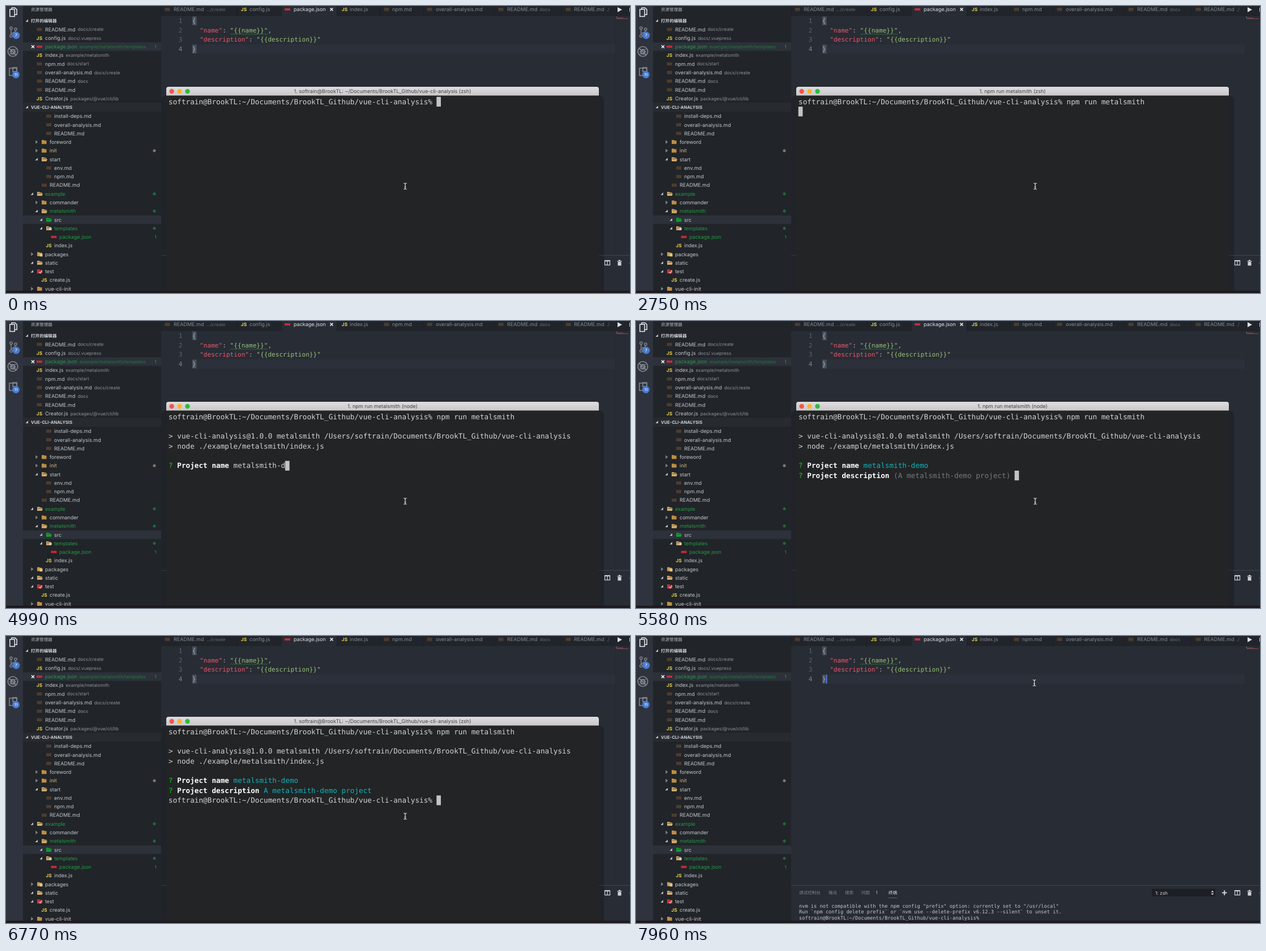
Write an HTML page with a canvas that moves like this. It is 1102 by 508 pixels and loops after 8000 ms.

```html
<!DOCTYPE html>
<html lang="zh">
<head>
<meta charset="utf-8">
<title>Metalsmith demo</title>
<style>
html, body { margin: 0; width: 100%; height: 100%; overflow: hidden; background: #282c34; }
canvas { display: block; }
</style>
</head>
<body>
<canvas id="stage" width="1102" height="508"></canvas>
<script>
const ctx = document.getElementById('stage').getContext('2d');
const LOOP = 8000;
const UI = 'Inter, "Noto Sans CJK SC", "Noto Sans CJK", sans-serif';
const MONO = '"DejaVu Sans Mono", monospace';
const USER = 'softrain@BrookTL:';
const REPO = '/Documents/BrookTL_Github/vue-cli-analysis';
const PROMPT = USER + '~' + REPO + '% ';
const GREEN = '#239a45', GREY = '#c5c8cc', DIM = '#7f858d';

function rect(x, y, w, h, color) {
  ctx.fillStyle = color;
  ctx.fillRect(x, y, w, h);
}

function rounded(x, y, w, h, radii, color) {
  ctx.fillStyle = color;
  ctx.beginPath();
  ctx.roundRect(x, y, w, h, radii);
  ctx.fill();
}

function shape(color, ...points) {
  ctx.fillStyle = color;
  ctx.beginPath();
  points.forEach(([x, y]) => ctx.lineTo(x, y));
  ctx.closePath();
  ctx.fill();
}

function line(color, width, ...points) {
  ctx.strokeStyle = color;
  ctx.lineWidth = width;
  ctx.beginPath();
  points.forEach(([x, y]) => ctx.lineTo(x, y));
  ctx.stroke();
}

function frame(x, y, w, h, color, width) {
  ctx.strokeStyle = color;
  ctx.lineWidth = width;
  ctx.strokeRect(x, y, w, h);
}

function disc(x, y, r, color) {
  ctx.fillStyle = color;
  ctx.beginPath();
  ctx.arc(x, y, r, 0, 7);
  ctx.fill();
}

function ring(x, y, r, color, width = 1.3) {
  ctx.strokeStyle = color;
  ctx.lineWidth = width;
  ctx.beginPath();
  ctx.arc(x, y, r, 0, 7);
  ctx.stroke();
}

// Draws text centred vertically on y; returns its right edge.
function text(str, x, y, color = GREY, size = 9, { font = UI, weight = 400, align = 'left' } = {}) {
  ctx.font = `${weight} ${size}px ${font}`;
  ctx.textAlign = align;
  ctx.fillStyle = color;
  ctx.fillText(str, x, y + size * (font === MONO ? 0.325 : 0.365));
  return x + ctx.measureText(str).width;
}

function twisty(x, y, open) {
  if (open) shape('#c5c8cc', [x - 2.5, y + 2], [x + 2, y + 2], [x + 2, y - 2.5]);
  else {
    shape('#aeb2b8', [x - 1.5, y - 3], [x + 2, y], [x - 1.5, y + 3]);
    shape('#212428', [x - 0.7, y - 1.2], [x + 0.6, y], [x - 0.7, y + 1.2]);
  }
}

function folder(x, y, color, open) {
  shape(color, [x - 4.5, y - 3.5], [x - 0.5, y - 3.5], [x + 0.5, y - 2.5], [x + 4, y - 2.5],
    [x + 4, y + 3.5], [x - 4.5, y + 3.5]);
  if (open) {
    line('#3a3328', 0.8, [x - 3.5, y - 0.8], [x + 4, y - 0.8]);
    shape(color, [x - 3, y - 0.4], [x + 5.5, y - 0.4], [x + 4, y + 3.5], [x - 4.5, y + 3.5]);
  }
}

const icons = {
  md: (x, y) => rect(x - 4.5, y - 2.8, 9, 5.6, '#4d3c31'),
  js: (x, y) => text('JS', x, y, '#e8d44d', 8.3, { weight: 700, align: 'center' }),
  npm: (x, y) => rect(x - 5, y - 2, 10, 4, '#c02c39'),
  closed: (x, y) => folder(x, y, '#bd8f46'),
  open: (x, y) => folder(x, y, '#d3ac6c', true),
  src: (x, y) => folder(x, y, '#169b35', true),
  test: (x, y) => {
    folder(x, y, '#d8323f', true);
    line('#f3c9c9', 1.2, [x - 1, y + 1], [x + 1, y + 3], [x + 4, y - 2]);
  },
  packages: (x, y) => {
    folder(x, y, '#c79a50');
    rect(x, y - 1, 5, 5, '#e4c98f');
  },
  templates: (x, y) => {
    folder(x, y, '#c8a66d', true);
    rect(x + 1, y - 1, 4, 4, '#d9d4c8');
  }
};

const editors = [
  ['README.md', 'docs/create', 'md'], ['config.js', 'docs/.vuepress', 'js'],
  ['package.json', 'example/metalsmith/templates', 'npm'], ['index.js', 'example/metalsmith', 'js'],
  ['npm.md', 'docs/start', 'md'], ['overall-analysis.md', 'docs/create', 'md'],
  ['README.md', 'docs', 'md'], ['README.md', '', 'md'], ['Creator.js', 'packages/@vue/cli/lib', 'js']
];

// name, text x, icon, twisty (1 open, 0 closed), colour, badge
const tree = [
  ['install-deps.md', 85, 'md'], ['overall-analysis.md', 85, 'md'], ['README.md', 85, 'md'],
  ['foreword', 77, 'closed', 0], ['init', 77, 'closed', 0, '#dbb981', '#7d776a'],
  ['start', 77, 'open', 1], ['env.md', 85, 'md'], ['npm.md', 85, 'md'], ['README.md', 77, 'md'],
  ['example', 69, 'open', 1, GREEN, '#1d6a38'], ['commander', 77, 'closed', 0],
  ['metalsmith', 77, 'open', 1, GREEN, '#1d6a38'], ['src', 85, 'src', 1],
  ['templates', 85, 'templates', 1, GREEN, '#1d6a38'], ['package.json', 94, 'npm', , GREEN, '1'],
  ['index.js', 85, 'js'], ['packages', 69, 'packages', 0], ['static', 69, 'open', 1],
  ['test', 69, 'test', 1], ['create.js', 77, 'js'], ['vue-cli-init', 69, 'closed', 0]
];

// left edge, icon x, text x, name, folder, icon
const tabs = [
  [274, 285, 296, 'README.md', '.../create', 'md'], [407, 420, 430, 'config.js', '', 'js'],
  [486, 497, 508, 'package.json', '', 'npm'], [584, 598, 607, 'index.js', '', 'js'],
  [660, 672, 682, 'npm.md', '', 'md'], [736, 748, 759, 'overall-analysis.md', '', 'md'],
  [862, 874, 885, 'README.md', 'docs', 'md'], [980, 993, 1003, 'README.md', './', 'md']
];

function badge(x, y, label) {
  disc(x, y, 6.5, '#4a7bd0');
  text(label, x, y, '#fff', 6.8, { align: 'center', weight: 500 });
}

function activityBar() {
  const pale = '#858a93', bright = '#e9ebee';
  rect(0, 0, 30, 508, '#2f333d');
  frame(6.8, 6, 8.4, 12.5, bright, 1.5);
  line(bright, 1.5, [10, 6], [10, 3.2], [16, 3.2], [19.2, 6.4], [19.2, 15.2], [15, 15.2]);
  [[9, 39], [17, 41], [9, 53]].forEach(([x, y]) => ring(x, y, 2.2, pale));
  line(pale, 1.4, [9, 41], [9, 51]);
  line(pale, 1.4, [17, 43], [16, 46], [9, 49]);
  badge(18, 52, '7');
  ring(12, 80.5, 8.7, pale, 1.6);
  ring(12, 81, 3.5, pale, 2);
  line(pale, 1.3, [6, 75], [18, 87]);
  [77, 81, 85].forEach(y => line(pale, 1, [6, y], [18, y]));
  frame(6, 110, 13, 13, pale, 1.5);
  frame(12, 109, 7, 7, pale, 1.5);
  badge(17.5, 121.5, '11');
}

function sideBar() {
  rect(30, 0, 244, 508, '#212428');
  text('资源管理器', 44, 6, '#b3b7bd', 7.6);
  rect(30, 171, 244, 16, '#272a2f');
  twisty(37, 26, true);
  text('打开的编辑器', 44, 26, '#d0d3d7', 7.6, { weight: 700 });
  twisty(37, 179, true);
  text('VUE-CLI-ANALYSIS', 44, 179, '#d0d3d7', 7.6, { weight: 700 });

  editors.forEach(([name, path, icon], i) => {
    const y = 41.4 + i * 15.27, active = i === 2;
    if (active) {
      rect(30, y - 7.6, 244, 15.2, '#2c313a');
      line('#fff', 1.5, [45, y - 2.5], [50, y + 2.5]);
      line('#fff', 1.5, [50, y - 2.5], [45, y + 2.5]);
      text('1', 264, y, GREEN, 8.1, { align: 'center' });
    }
    icons[icon](59, y);
    const end = text(name, 69, y, active ? GREEN : GREY);
    text(path, end + 4, y, active ? '#207a3b' : '#8f9399', 8.1);
  });

  tree.forEach(([name, x, icon, open, color, mark], i) => {
    const y = 195 + i * 15.27;
    if (name === 'src') rect(30, y - 7.6, 244, 15.2, '#2c313a');
    if (open !== undefined) twisty(x - 23, y, open);
    icons[icon](x - 9.5, y);
    text(name, x, y, color);
    if (mark === '1') text(mark, 264, y, GREEN, 8.1, { align: 'center' });
    else if (mark) disc(262, y, 2.6, mark);
  });
}

function tabBar() {
  rect(274, 0, 828, 18, '#21252b');
  tabs.forEach(([left, iconX, x, name, path, icon]) => {
    const active = icon === 'npm';
    if (active) rect(left, 0, 98, 18, '#282c34');
    rect(left, 0, 0.7, 18, '#1a1d22');
    icons[icon](iconX, 6);
    const end = text(name, x, 6, active ? '#e2e4e8' : '#858a93');
    text(path, end + 4, 6, '#646a74', 8.1);
  });
  line('#fff', 1.4, [572.5, 3.5], [577.5, 8.5]);
  line('#fff', 1.4, [577.5, 3.5], [572.5, 8.5]);
  rect(1072, 0, 30, 18, '#21252b');
  shape('#dcdfe4', [1080, 2], [1088, 6.5], [1080, 11]);
  rect(1101, 3, 1, 7, '#c5c8cc');
}

function editor(caret) {
  const size = 11.1, key = '#e8586c', string = '#98c379', plain = '#abb2bf';
  const code = [
    [['{', plain]],
    [['  "name"', key], [': ', plain], ['"{{name}}"', string], [',', plain]],
    [['  "description"', key], [': ', plain], ['"{{description}}"', string]],
    [['}', plain]]
  ];
  rect(274, 18, 828, 490, '#282c34');
  rect(329, 68, 747, 16.5, '#2b303a');
  [18.5, 68.5].forEach(y => rect(329, y, 7.5, 15.5, '#4a505c'));
  code.forEach((spans, i) => {
    const y = 26.3 + i * 16.6;
    text(String(i + 1), 308, y, i === 3 ? '#7d8593' : '#596273', size, { font: MONO, align: 'center' });
    let x = 328.8;
    for (const [str, color] of spans) x = text(str, x, y, color, size, { font: MONO });
  });
  const wave = Array.from({ length: 34 }, (_, i) => [396 + i * 2, i % 2 ? 48.8 : 50.8]);
  line('#2b8a40', 0.8, ...wave);
  rect(1076, 18, 1, 423, '#252930');
  rect(1077, 19, 2, 1, '#777d88');
  rect(1078, 20.5, 12, 1, '#8a4a56');
  rect(1078, 22, 21, 1, '#8a4a56');
  if (caret) rect(336, 68.5, 1.4, 15.5, '#528bff');
}

function panel() {
  const pale = '#d0d3d8';
  rect(274, 441, 828, 1, '#41464f');
  [['调试控制台', 288], ['输出', 340], ['搜索', 369], ['问题', 398], ['1', 423.5]]
    .forEach(([label, x]) => text(label, x, 454.6, x > 420 ? GREY : DIM, 7.6));
  text('终端', 446, 454.6, '#e4e6ea', 7.6);
  rect(446, 463, 15, 0.8, '#6b717c');
  rect(911, 447.5, 112, 13.5, '#1c1f24');
  text('1: zsh', 917, 454.5, '#d8dade', 8.3);
  shape(pale, [1015.5, 453.5], [1018, 450.5], [1020.5, 453.5]);
  shape(pale, [1015.5, 455.5], [1018, 458.5], [1020.5, 455.5]);
  line(pale, 2, [1035, 454.5], [1043.5, 454.5]);
  line(pale, 2, [1039.2, 450.2], [1039.2, 458.8]);
  frame(1057.5, 450.5, 9, 8, pale, 1.2);
  rect(1057, 450, 10, 2, pale);
  rect(1061.5, 451, 1.2, 8, pale);
  rect(1079.5, 451, 8, 1.3, pale);
  rect(1082, 449.5, 3, 1.5, pale);
  rect(1080.5, 453, 6, 6.5, pale);
  line('#7d828a', 0.8, [1100.5, 456], [1102, 454]);
  [
    'nvm is not compatible with the npm config "prefix" option: currently set to "/usr/local"',
    'Run `npm config delete prefix` or `nvm use --delete-prefix v6.12.3 --silent` to unset it.',
    PROMPT
  ].forEach((str, i) => text(str, 288, 477.9 + i * 10.45, '#c3c7ce', 8.66, { font: MONO }));
}

// Value of the last [time, value] pair that has been reached.
const latest = (pairs, t) => pairs.filter(([start]) => start <= t).pop()[1];

const typedCommand = [[0, 0], [750, 1], [960, 2], [1110, 3], [1260, 4], [1410, 6], [1560, 7], [1700, 8], [2450, 18]];
const typedAnswer = [[0, 0], [4540, 10], [4840, 11], [4990, 12], [5140, 13], [5280, 15]];
const home = `1. ${USER} ~${REPO}`;
const titles = [[0, home + ' (zsh)'], [2750, '1. npm run metalsmith (zsh)'],
  [3200, '1. npm run metalsmith (node)'], [6620, home + ' (node)'], [6770, home + ' (zsh)']];

function terminal(t) {
  const size = 12.7, left = 287, plain = '#d3d4d5', cyan = '#10b3bb';
  const rowY = row => 169.5 + row * 17.35;
  const write = (row, ...spans) => {
    let x = left;
    for (const [str, color = plain, weight] of spans)
      x = text(str, x, rowY(row), color, size, { font: MONO, weight });
    return [row, x];
  };
  const ask = (row, question, ...answer) =>
    write(row, ['? ', '#17a413', 700], [question + ' ', '#fff', 700], answer);

  rounded(274, 158, 782, 346, [9, 9, 0, 0], 'rgba(0,0,0,.2)');
  rounded(283, 143, 764, 361, [4, 4, 0, 0], '#222425');
  const bar = ctx.createLinearGradient(0, 143, 0, 159);
  bar.addColorStop(0, '#dfdddf');
  bar.addColorStop(1, '#c9c7c9');
  rounded(283, 143, 764, 15.6, [4, 4, 0, 0], bar);
  ['#f5544d', '#f6b52d', '#2bbd3d'].forEach((color, i) => disc(292.7 + i * 13.9, 151, 4.2, color));
  text(latest(titles, t), 665, 151, '#424242', 9, { align: 'center' });

  const command = 'npm run metalsmith'.slice(0, latest(typedCommand, t));
  let cursor = write(0, [PROMPT + command]);
  if (t >= 2750) cursor = [1, left];
  if (t >= 3200) {
    write(2, [`> vue-cli-analysis@1.0.0 metalsmith /Users/softrain${REPO}`]);
    write(3, ['> node ./example/metalsmith/index.js']);
    cursor = [5, left];
  }
  if (t >= 3800) {
    const answer = 'metalsmith-demo'.slice(0, latest(typedAnswer, t));
    cursor = ask(5, 'Project name', answer, t < 5580 ? plain : cyan);
  }
  if (t >= 5580) {
    const project = 'A metalsmith-demo project', accepted = t >= 6470;
    cursor = ask(6, 'Project description', accepted ? project : `(${project}) `, accepted ? cyan : '#77797a');
    if (accepted) cursor = [7, left];
  }
  if (t >= 6620) cursor = write(7, [PROMPT]);
  rect(cursor[1] - 0.3, rowY(cursor[0]) - 8.7, 7.7, 17.2, '#c2c3c3');
}

const pointerY = [[0, 319], [7220, 290], [7370, 215], [7520, 132], [7660, 88], [7810, 83]];

function pointer(t) {
  const y = latest(pointerY, t), x = t < 7520 ? 705 : 703.5;
  const arrow = (t >= 2150 && t < 2450) || (t >= 4250 && t < 4540);
  if (arrow) {
    const points = [[703.5, 313.5], [703.5, 327], [706.5, 324.3], [708.7, 329.3],
      [710.8, 328.4], [708.7, 323.6], [712.7, 323.3]];
    shape('#111', ...points);
    line('#e8e8e8', 0.9, ...points, points[0]);
    return;
  }
  const color = '#dcdddd';
  line(color, 1.2, [x - 2.7, y - 5.5], [x - 0.5, y - 4.7], [x, y - 3.5], [x, y + 3.5],
    [x - 0.5, y + 4.7], [x - 2.7, y + 5.5]);
  line(color, 1.2, [x + 2.7, y - 5.5], [x + 0.5, y - 4.7], [x, y - 3.5]);
  line(color, 1.2, [x + 2.7, y + 5.5], [x + 0.5, y + 4.7], [x, y + 3.5]);
  line(color, 1, [x - 1.5, y + 1.5], [x + 1.5, y + 1.5]);
}

function draw(t) {
  const windowOpen = t < 7960;
  ctx.textRendering = 'geometricPrecision';
  editor(!windowOpen);
  tabBar();
  panel();
  activityBar();
  sideBar();
  if (windowOpen) terminal(t);
  rect(0, 504, 1102, 4, '#1d191f');
  pointer(t);
}

const start = performance.now();
function tick() {
  draw((performance.now() - start) % LOOP);
  requestAnimationFrame(tick);
}
tick();
</script>
</body>
</html>
```
